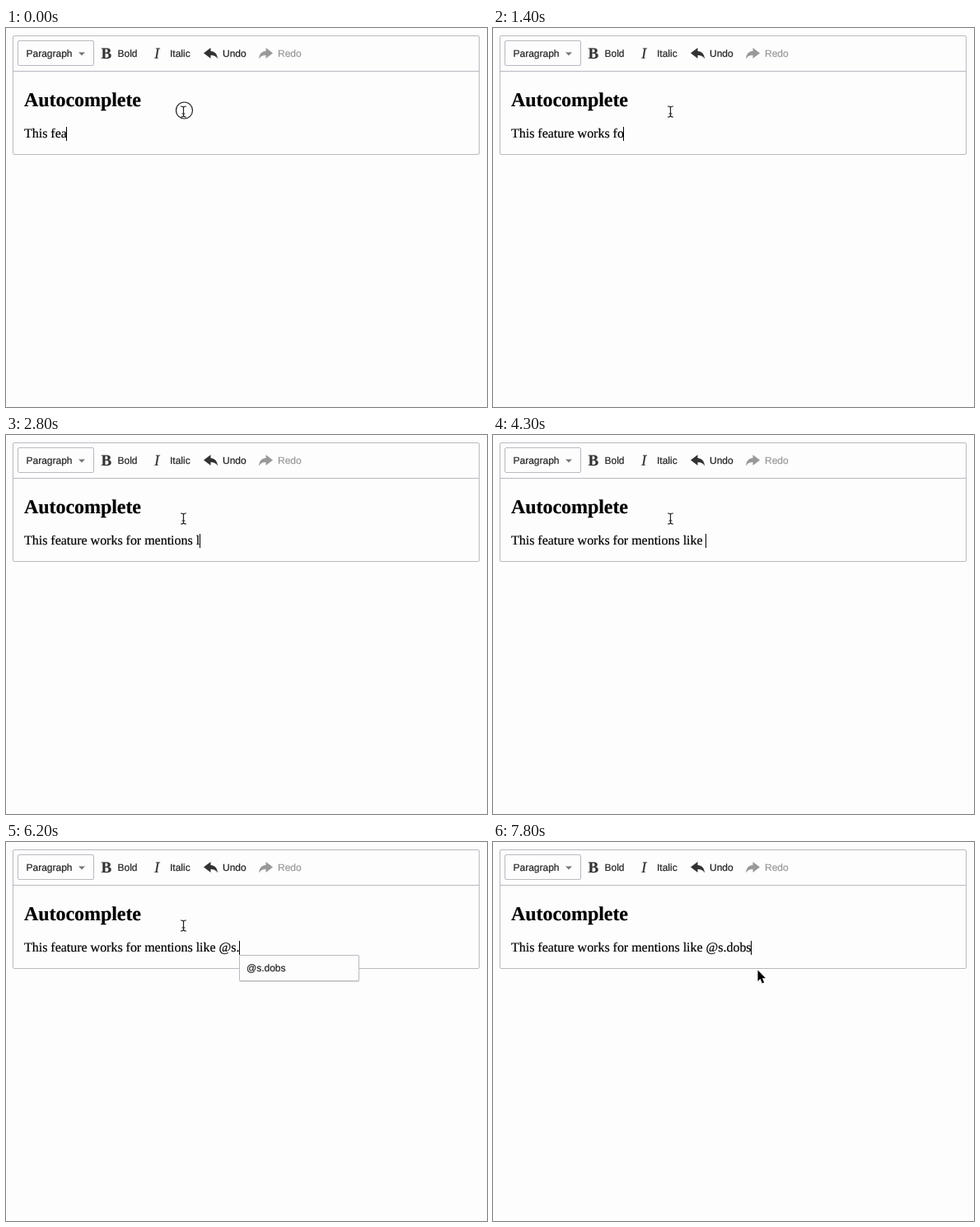
Recreate the animation shown at these times as an HTML page. Size 584x460 px, loop 8 s.

```html
<!DOCTYPE html>
<html lang="en">
<head>
<meta charset="utf-8">
<title>Autocomplete</title>
<style>
  html, body { margin: 0; width: 100%; height: 100%; overflow: hidden; background: #fdfdfd; }
  svg { display: block; color: #000; }
  text { white-space: pre; font-kerning: none; text-rendering: geometricPrecision;
    fill: currentColor; stroke: currentColor; stroke-width: .2px; }
  .ui { font: 12px "Liberation Sans", Arial, sans-serif; color: #222; }
  .serif { font: 16px "Liberation Serif", "Times New Roman", serif; letter-spacing: -.02px; }
  .title { font-size: 24px; font-weight: bold; letter-spacing: -.06px; }
  .icon { font-size: 19px; color: #333; }
  .off { color: #999; }
  .frame { fill: #fdfdfd; stroke: #b7bac0; }
</style>
</head>
<body>
<svg width="584" height="460" viewBox="0 0 584 460">
  <defs>
    <path id="bend" d="M0 6.500L8.500 0V4C13.500 4.200 16.500 7.500 17 13.500C15 10.300 12.500 9 8.500 9V13Z" fill="currentColor"/>
  </defs>
  <rect class="frame" x="8.5" y="9.5" width="566" height="144" rx="1.5"/>
  <path class="frame" d="M9 52.5H574"/>

  <g class="ui">
    <rect class="frame" x="14.5" y="15.5" width="92" height="30" rx="1.5"/>
    <text x="24.5" y="35">Paragraph</text>
    <path d="M88 29.5h8l-4 4z" fill="#777"/>
    <text class="serif icon" x="115.5" y="37" font-weight="bold" style="font-weight:bold">B</text>
    <text x="135.5" y="35">Bold</text>
    <text class="serif icon" x="180" y="37" style="font-style:italic">I</text>
    <text x="199" y="35">Italic</text>
    <use href="#bend" class="icon" x="240" y="24"/>
    <text x="263" y="35">Undo</text>
    <use href="#bend" class="off" transform="translate(324 24) scale(-1 1)"/>
    <text class="off" x="330" y="35">Redo</text>
  </g>

  <text class="serif title" x="22" y="94.7">Autocomplete</text>
  <text class="serif" id="line" x="22" y="133"></text>
  <rect id="caret" y="120" width="1" height="17"/>

  <g id="panel" class="ui">
    <rect id="shade" y="138" width="146" rx="1.5" opacity=".12"/>
    <rect id="box" class="frame" x=".5" y="137.5" width="145" rx="1.5"/>
    <g id="items"></g>
  </g>

  <g id="beam" fill="none" stroke="#222" stroke-width="1.2" stroke-linecap="round">
    <path d="M-3-6.500Q0-6.500 0-4.500Q0-6.500 3-6.500M0-5V5M-3 6.500Q0 6.500 0 4.500Q0 6.500 3 6.500M-1.500 2.500H1.500"/>
    <circle id="ring" cx="1" cy="-1.5" r="10"/>
  </g>
  <path id="arrow" d="M0 0V13.500L3.100 10.600L5.300 16L7.700 15L5.500 9.700H9.500Z" stroke="#fff" stroke-width="1.2" paint-order="stroke"/>
</svg>
<script>
const $ = id => document.getElementById(id);
const show = (id, on) => $(id).setAttribute("display", on ? "inline" : "none");
const set = (id, name, value) => $(id).setAttribute(name, value);

const LOOP = 8000, STEP = 100;
const OPEN = 46, PICK = 78;    // mention panel opens, item is picked
const MOVE = 68, HOVER = 73, REST = 76;    // pointer leaves, turns into an arrow, stops
const names = ["@hantzi", "@lavo", "@mtanisk", "@nkoriez", "@r.dulotarsk",
  "@rostumi", "@s.dobs", "@studriel"];

// Bursts of typing, each from its step on, one character per step
const bursts = { 1: "ture w", 7: "orks", 12: " for", 17: " m", 20: "enti", 24: "ons l",
  31: "ik", 40: "e", 43: " ", [OPEN]: "@", 55: "s", 62: "." };

function typedAt(k) {
  let text = "This fea", lastKey = 0;
  for (const [from, chars] of Object.entries(bursts)) {
    const part = chars.slice(0, Math.max(0, k - from + 1));
    text += part;
    if (part) lastKey = +from + part.length - 1;
  }
  return k < PICK ? { text, lastKey } : { text: text + "dobs", lastKey: PICK };
}

function drawPanel(x, query) {
  const found = names.filter(n => n.startsWith(query));
  const height = Math.round(found.length * 29.15 + 1.6);
  set("panel", "transform", `translate(${x})`);
  set("box", "height", height);
  set("shade", "height", height + 1);
  $("items").innerHTML = found.map((n, i) =>
    `<text x="9" y="${Math.round(157 + i * 29.25)}">${n}</text>`).join("");
}

function drawPointer(k) {
  const p = Math.min(1, Math.max(0, (k - MOVE) / (REST - MOVE)));
  const x = 215.5 + 106 * (1 - (1 - p) ** 2), y = 101.5 + 54 * p;
  for (const id of ["beam", "arrow"]) set(id, "transform", `translate(${x} ${y})`);
  show("beam", k < HOVER);
  show("arrow", k >= HOVER);
  show("ring", k < 1);
}

function draw(now) {
  const k = Math.floor(now % LOOP / STEP);
  const { text, lastKey } = typedAt(k);
  $("line").textContent = text;
  const x = Math.round(21.6 + $("line").getComputedTextLength());
  set("caret", "x", x);
  show("caret", (k - lastKey) % 9 < 4);

  const open = k >= OPEN && k < PICK;
  show("panel", open);
  if (open) drawPanel(x, text.slice(text.indexOf("@")));
  drawPointer(k);
  requestAnimationFrame(draw);
}
requestAnimationFrame(draw);
</script>
</body>
</html>
```
